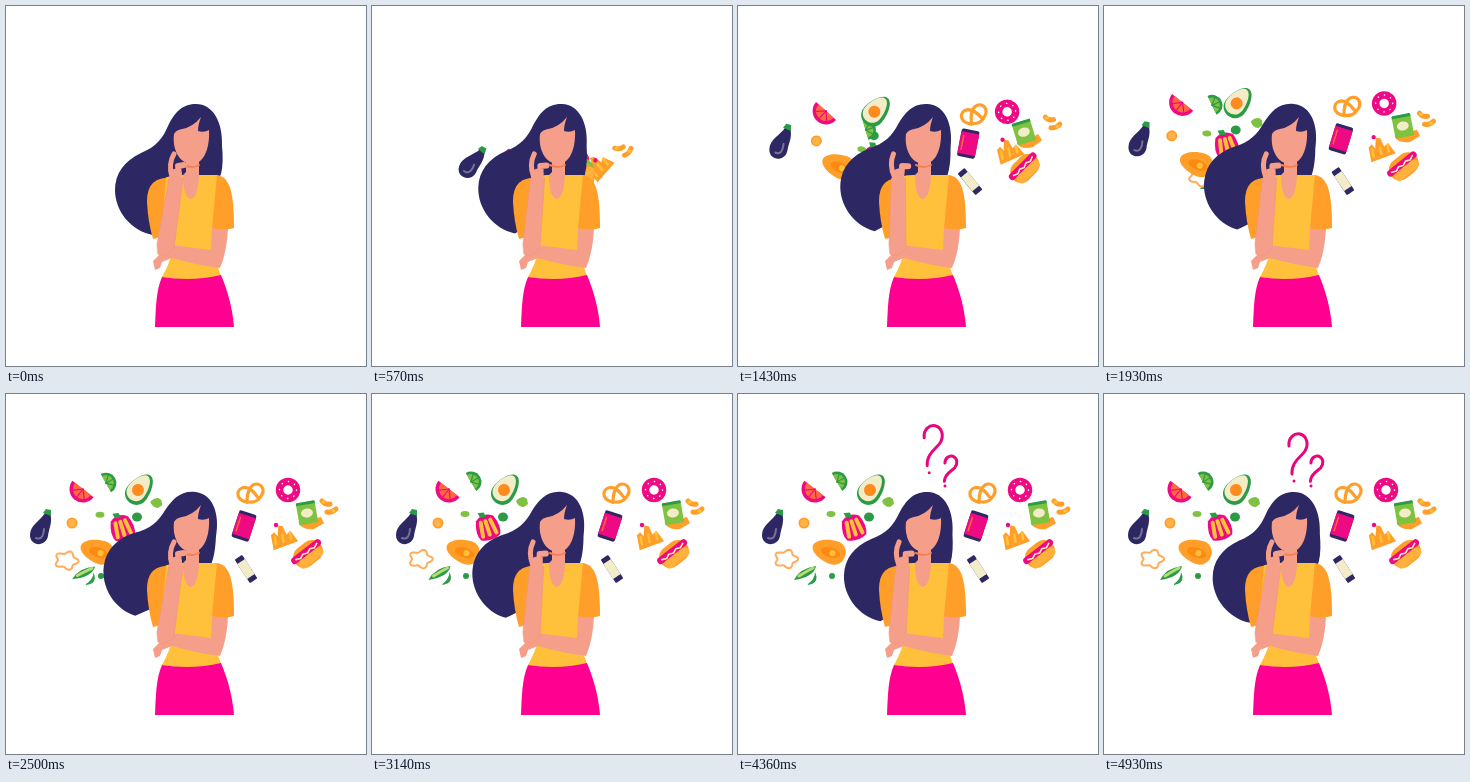
Animation, 360 px wide and 360 px high, one loop 5 s. Source, as an HTML page:

```html
<!DOCTYPE html>
<html lang="en">
<head>
<meta charset="utf-8">
<title>What to eat?</title>
<style>
  html, body { margin: 0; height: 100%; overflow: hidden; background: #fff; }
  svg { display: block; width: 100vw; height: 100vh; }
</style>
</head>
<body>
<svg viewBox="0 0 360 360" fill="none" stroke-linecap="round" stroke-linejoin="round">
  <defs>
    <path id="mark" d="M-5-35C-6-43 0-48 6-47C13-45 15-37 11-30C7-24-3-19-2-7M0 0h.01"/>
  </defs>
  <g id="foods"></g>
  <g stroke="#e8067f">
    <use id="big" href="#mark" stroke-width="3"/>
    <use id="small" href="#mark" stroke-width="4.6"/>
  </g>
  <path id="hair" fill="#2d2763" d="M190 98C207 98 217 116 216 140C217 150 217 160 215 168C205 195 170 215 147 229C125 225 109 205 109 184C109 168 118 155 135 147C150 141 157 132 162 120C168 108 175 98 190 98"/>
  <path fill="#ffc13b" d="M157 173Q163 169 176 169H212L213 223L208 250L215 270Q186 277 156 271Q163 258 165 250L156 232Z"/>
  <path fill="#f59f8a" d="M180 150H193V169Q192 193 184 193Q177 190 177 169L180 166Z"/>
  <path stroke="#f5804f" stroke-width="2" d="M178 159Q186 163 193 159"/>
  <path fill="#f59f8a" d="M168 128Q170 124 176 123Q187 121 195 111Q192 119 192 125Q198 127 203 124C204 144 197 158 186 158C174 158 166 144 168 128Z"/>
  <path fill="#ff0090" d="M156 271Q186 276 215 269C222 285 227 305 228 321H149C150 300 150 285 156 271Z"/>
  <path fill="#f59f8a" d="M206 222H222Q221 246 214 262Q190 259 166 252L156 256L154 262L149 264L147 255L153 249L165 239L205 244Z"/>
  <path fill="#ff9f2a" d="M211 169C224 171 228 186 228 222Q217 225 206 222Z"/>
  <path fill="#ff9f2a" d="M160 172C145 173 141 183 141 196Q142 216 147 233L155 231Z"/>
  <path id="arm" fill="#f59f8a" stroke="#f0937f" stroke-width=".6"/>
  <g id="hand" stroke="#f59f8a">
    <path d="M170 173V168" stroke-width="11"/>
    <path id="index" d="M166 171Q162 158 168 148" stroke-width="5"/>
    <path id="thumb" d="M173 168L172 160L178 159" stroke-width="6"/>
  </g>
</svg>
<script>
const LOOP = 5000, STEP = LOOP / 70;
const PINK = '#ee0a83', NAVY = '#2d2763', ORANGE = '#ff9f2a', YELLOW = '#ffc13b',
  GREEN = '#2c9b45', LIME = '#7fc241', CREAM = '#f3ecc8';

const $ = id => document.getElementById(id);
const repeat = (n, draw) => Array.from({ length: n }, (_, i) => draw(i)).join('');
const path = (d, fill) => `<path d="${d}" fill="${fill}"/>`;
const line = (d, color, width) => `<path d="${d}" stroke="${color}" stroke-width="${width}"/>`;
const oval = (x, y, rx, ry, fill) => `<ellipse cx="${x}" cy="${y}" rx="${rx}" ry="${ry}" fill="${fill}"/>`;
const dot = (x, y, r, fill) => oval(x, y, r, r, fill);
const box = (w, h, fill, r = 1, y = 0) =>
  `<rect x="${-w / 2}" y="${y - h / 2}" width="${w}" height="${h}" rx="${r}" fill="${fill}"/>`;
const half = (r, fill) => path(`M${-r} 0A${r} ${r} 0 0 0 ${r} 0Z`, fill);
const slice = (r, rind, flesh) => half(r, rind) + half(r * .75, flesh) + repeat(3, i => {
  const a = (i + 1) * Math.PI / 4;
  return line(`M0 0L${r * .8 * Math.cos(a)} ${r * .8 * Math.sin(a)}`, rind, 1.2);
});
const egg = (w, h, fill) => path(`M0${-h}C${w * .6}${-h} ${w}${-h * .2} ${w} ${h * .3}` +
  `C${w} ${h * 1.23} ${-w} ${h * 1.23} ${-w} ${h * .3}C${-w}${-h * .2} ${-w * .6}${-h} 0${-h}Z`, fill);
const flower = (r, petals) => 'M' + Array.from({ length: 60 }, (_, i) => {
  const a = i * Math.PI / 30, d = r * (1 + .18 * Math.cos(petals * a));
  return `${(1.15 * d * Math.cos(a)).toFixed(1)} ${(.9 * d * Math.sin(a)).toFixed(1)}`;
}).join('L') + 'Z';

const foods = [];
function food(wave, x, y, tilt, art) {
  const el = document.createElementNS('http://www.w3.org/2000/svg', 'g');
  el.innerHTML = art;
  $('foods').append(el);
  foods.push({ el, x, y, tilt, start: [100, 330, 850, 1350][wave], spin: x < 172 ? 35 : -60 });
}

// healthy side
food(3, 68, 181, 0, path('M-12 5Q-6-7 10-9Q8 2-12 5Z', GREEN) + line('M-7 1Q1-4 7-7', '#b5dc78', 3) +
  path('M2 9Q9 4 9-3Q14 8 2 10Z', GREEN));
food(3, 48, 165, 0, line(flower(9, 5), '#ffac5c', 2));
food(2, 94, 182, 0, dot(0, 0, 3, GREEN));
food(0, 35, 132, 0, path('M4-13C0-6-11-1-11 9C-11 21 5 21 7 10C8 2 12-4 9-13Z', NAVY) +
  line('M-5 12Q2 15 3 3', '#77728f', 2) + path('M2-13L5-17L10-16V-10Z', GREEN));
food(1, 66, 129, 0, dot(0, 0, 5.5, ORANGE) + dot(0, 0, 3.8, '#ffb347'));
food(1, 91, 157, 18, `<g transform="rotate(-90)">${egg(12, 17, ORANGE)}</g>` +
  oval(2, 1, 10, 5, '#ff8a12') + dot(4, 1, 3, YELLOW));
food(2, 115, 132, -18, path('M-9-8Q0-15 9-8Q14 4 10 12Q0 17-10 12Q-14 4-9-8Z', PINK) +
  repeat(3, i => line(`M${5 * i - 5}-5L${7 * i - 7} 9`, YELLOW, 4)) + path('M-5-15L1-14L2-9L-4-10Z', GREEN));
food(2, 93, 120, 0, oval(0, 0, 4.5, 3, LIME));
food(1, 131, 123, 0, oval(0, 0, 5, 4.5, GREEN));
food(2, 150, 108, 0, path('M-6-1Q-3-5 2-5L5-3L6 2L2 5Q-4 5-6-1Z', LIME));
food(2, 99, 88, 240, slice(10.5, GREEN, LIME));
food(1, 77, 95, 38, slice(13.5, PINK, '#ff6a3c'));
food(1, 134, 95, 38, egg(11.5, 17, GREEN) + `<g transform="translate(-1.5 -.5)">${egg(9.5, 14.5, CREAM)}</g>` +
  dot(-1, 2, 6, '#ff8a1e'));

// tempting side
food(1, 245, 100, -16, line('M-6 7C-18 0-12-10-4-8C2-6 4 1 6 6M6 7C18 0 12-10 4-8C-2-6-4 1-6 6Q0 10 6 7', ORANGE, 3.2));
food(1, 282, 96, 0, `<circle r="8.5" stroke="${PINK}" stroke-width="7.5"/>` +
  `<circle r="8.5" stroke="#fff" stroke-width="1.4" stroke-dasharray=".3 6.4"/>`);
food(1, 240, 175, -33, box(9, 28, NAVY) + box(9, 18, CREAM, 0));
food(1, 238, 132, 18, box(18, 28, NAVY, 2) + box(18, 22, PINK) + line('M-6-7V7', '#ff6a3c', 1.5));
food(0, 321, 113, 0, line('M-5-6Q-2-2 3-3M0 5Q5 6 9 2', ORANGE, 5) + line('M-4-5h1M6 4h1', YELLOW, 3));
food(1, 301, 119, -10, path('M-10 8Q-2 4 4 8L13 6L15 13L4 17Q-9 16-10 8Z', ORANGE) + box(19, 22, LIME) +
  box(19, 3, GREEN, 1, -10) + oval(0, 0, 6, 4.5, CREAM));
food(0, 276, 143, -18, path('M-12 10L-10-5L-6-7L-4-2L0-12L4-10L5-1L10-3L14 9Z', ORANGE) +
  repeat(3, i => line(`M${8 * i - 8} 5l1-7`, YELLOW, 2.5)));
food(0, 270, 131, 0, dot(0, 0, 2.2, PINK));
food(1, 302, 160, -38, box(32, 22, ORANGE, 11) + box(36, 7, PINK, 3.5, -3) + box(28, 9, '#ffb13b', 4, 5) +
  line('M-13-3' + repeat(6, i => `l4.4 ${i % 2 ? -2 : 2}`), '#fff0b0', 1.6));

// share of the way still to go, easing out
const remaining = (t, start, span) => (1 - Math.min(1, Math.max(0, (t - start) / span))) ** 3;
function place(el, shown, transform) {
  el.setAttribute('visibility', shown ? 'visible' : 'hidden');
  el.setAttribute('transform', transform);
}

function draw(t) {
  for (const { el, x, y, tilt, start, spin } of foods) {
    const r = remaining(t, start, 2150);
    place(el, t > start, `translate(${x + (172 - x) * r} ${y + (180 - y) * r}) rotate(${tilt + spin * r})`);
  }

  const b = remaining(t, 3800, 1000), s = remaining(t, 3450, 660);
  place($('big'), t > 3800, `translate(${190 + 14 * b} ${87 - 95 * b})`);
  place($('small'), t > 3450, `translate(207 ${92 - 100 * s}) rotate(8) scale(.65)`);

  const sway = 1 - Math.abs(1 - t / 2500);
  $('hair').setAttribute('transform', `rotate(${8 * sway} 190 98)`);

  const open = (1 - Math.cos(t / 2500 * 2 * Math.PI)) / 2, shift = 10 * open;
  $('arm').setAttribute('d', `M151 238L${163 - shift} 172H${177 - shift}L168 242Q160 253 152 248Z`);
  $('hand').setAttribute('transform', `translate(${-shift} 0)`);
  $('index').setAttribute('transform', `rotate(${-8 * open} 166 171)`);
  $('thumb').setAttribute('transform', `rotate(${12 * open} 173 168)`);
}

function tick(now) {
  draw(Math.floor(((now + 2) % LOOP) / STEP) * STEP);
  requestAnimationFrame(tick);
}
tick(0);
</script>
</body>
</html>
```
